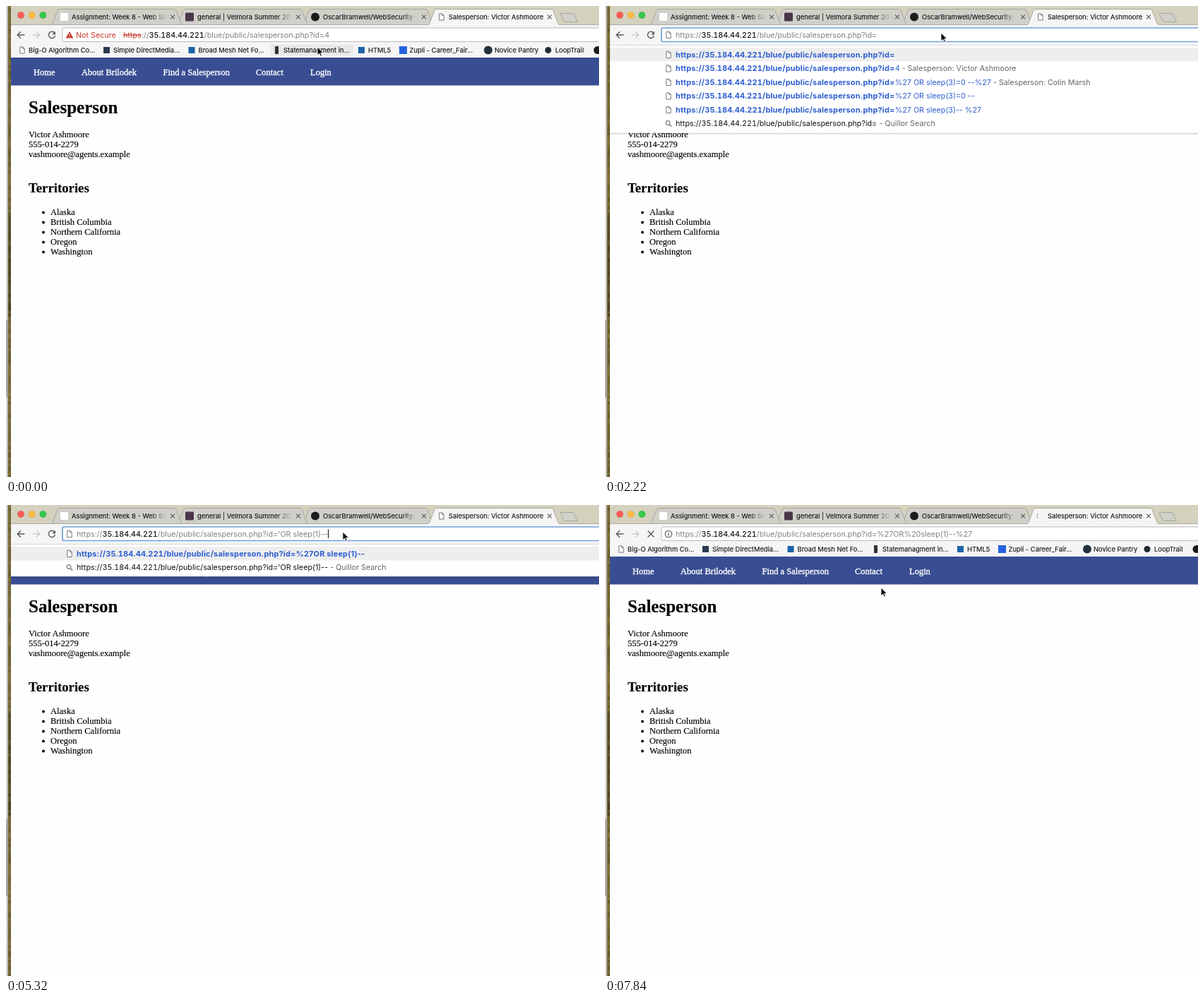
Write an HTML page that moves like this. It is 840 by 667 pixels and loops after 7990 ms.

```html
<!DOCTYPE html>
<html lang="en">
<head>
<meta charset="utf-8">
<title>Salesperson</title>
<style>
  html, body { margin: 0; width: 100%; height: 100%; overflow: hidden; background: #fefefe; }
  svg { display: block; }
  text { white-space: pre; }
  .ui { font-family: Inter, "Open Sans", sans-serif; font-size: 9.4px; fill: #111; stroke: #111; stroke-width: .12; }
  .url { font-family: Inter, "Open Sans", sans-serif; font-size: 10.75px; fill: #111; }
  .page { font-family: "Liberation Serif", "Times New Roman", serif; font-size: 12.5px; fill: #000; stroke: #000; stroke-width: .15; }
  .nav { fill: #fff; stroke: #fff; stroke-width: .35; }
  .h1 { font-size: 25px; font-weight: 700; }
  .h2 { font-size: 18.75px; font-weight: 700; }
  .tab { font-variant-numeric: tabular-nums; }
  .dim { fill: #808080; }
  .host { fill: #161616; font-weight: 500; }
  .bad { fill: #c5392b; }
  .strike { text-decoration: line-through; }
  .link { fill: #2f5fd0; }
  .bold { font-size: 11px; font-weight: 700; letter-spacing: .14px; }
  .note { fill: #666; }
</style>
</head>
<body>
<svg id="stage" width="840" height="667" viewBox="0 0 840 667">
  <defs>
    <linearGradient id="fade">
      <stop offset="0" stop-color="#d0d0ca" stop-opacity="0"/>
      <stop offset=".85" stop-color="#d0d0ca"/>
    </linearGradient>
    <linearGradient id="shade" x2="0" y2="1">
      <stop offset="0" stop-opacity=".22"/>
      <stop offset="1" stop-opacity="0"/>
    </linearGradient>
  </defs>
  <g id="desk"></g>
  <g id="page"></g>
  <g id="chrome"></g>
  <g id="live"></g>
</svg>
<script>
const STEP = 148, LOOP = 7990, LAST = 53;
const PERSON = 'Victor Ashmoore';
const $ = id => document.getElementById(id);

const rect = (x, y, w, h, fill, more = '') =>
  `<rect x="${x}" y="${y}" width="${w}" height="${h}" fill="${fill}" ${more}/>`;
const circle = (x, y, r, fill, more = '') =>
  `<circle cx="${x}" cy="${y}" r="${r}" fill="${fill}" ${more}/>`;
const line = (d, color, width = 1, more = '') =>
  `<path d="${d}" fill="none" stroke="${color}" stroke-width="${width}" ${more}/>`;
const text = (x, y, cls, body) => `<text x="${x}" y="${y}" class="${cls}">${body}</text>`;
const span = (cls, body) => `<tspan class="${cls}">${body}</tspan>`;
const at = (x, y, body) => `<g transform="translate(${x} ${y})">${body}</g>`;

const HOST = span('tab', '35.184.44.221'), PATH = '/blue/public/salesperson.php?id=';
const BASE = 'https://' + HOST + PATH;

const fileIcon = (x, y) => at(x, y,
  '<path d="M-3.2-4.6H.8L3.2-2.2V4.6H-3.2Z M.8-4.6V-2.2H3.2" fill="#fff" stroke="#6a6a6a" stroke-width=".9"/>');
const searchIcon = (x, y) => at(x, y,
  circle(-1, -1, 2.8, 'none', 'stroke="#777" stroke-width="1.2"') + line('M1 1L4.2 4.2', '#777', 1.5));
const cross = (x, y, r, color, w) => at(x, y, line(`M${-r} ${-r}L${r} ${r}M${r} ${-r}L${-r} ${r}`, color, w));

function desk() {
  let seed = 7, out = rect(0, 0, 8, 667, '#6f5f2c');
  const rand = () => (seed = seed * 16807 % 2147483647) / 2147483647;
  for (let y = 0; y < 667; y += 4) {
    const dark = y > 290 && y < 440 ? 8 : 0;
    out += rect(3, y, 4, 4, `hsl(${44 + rand() * 6} 42% ${28 + rand() * 8 - dark}%)`);
  }
  return out + rect(0, 0, 2.6, 667, '#dcdcda') + rect(2.6, 0, .9, 667, '#8a836c') +
    rect(0, 445, 2, 109, '#a9a9a9') + rect(0, 583, 3, 1, '#b5b5b5') + rect(0, 630, 3, 1, '#b5b5b5');
}

function page() {
  let out = rect(7, 73, 833, 594, '#fefefe') + rect(7, 73, 833, 39.5, '#394d92');
  const nav = [[39, 'Home'], [107, 'About Brilodek'], [222.5, 'Find a Salesperson'], [354, 'Contact'], [431, 'Login']];
  for (const [x, s] of nav) out += text(x, 98, 'page nav', s);
  out += text(32, 152, 'page h1', 'Salesperson') + text(32, 264, 'page h2', 'Territories');
  [PERSON, '555-014-2279', 'vashmoore@agents.example'].forEach((s, i) => {
    out += text(32, 186 + 14 * i, 'page', s);
  });
  ['Alaska', 'British Columbia', 'Northern California', 'Oregon', 'Washington'].forEach((s, i) => {
    const y = 296 + 14 * i;
    out += circle(53, y - 3.6, 2, '#000') + text(63, y, 'page', s);
  });
  return out;
}

function tab(i, title, active) {
  const x = 178 * i, fill = active ? '#f5f5f5' : '#d0d0ca';
  const edge = `M${x + 63} 27Q${x + 65} 26.5 ${x + 66} 24.5L${x + 73} 6.5Q${x + 74} 4.5 ${x + 76} 4.5` +
    `H${x + 238}Q${x + 240} 4.5 ${x + 241} 6.5L${x + 248} 24.5Q${x + 249} 26.5 ${x + 251} 27`;
  return `<path d="${edge}" fill="${fill}" stroke="#a3a198" stroke-width=".9"/>` +
    text(x + 93, 19, 'ui', title) +
    (active ? '' : rect(x + 204, 7, 28, 17, 'url(#fade)')) +
    cross(x + 236, 15.5, 2.9, '#5c5c5c', 1.2);
}

function chrome() {
  let out = rect(7, 0, 833, 27, '#d4d1bf');
  ['#fc5b57', '#fdbc40', '#34c84a'].forEach((c, i) => {
    out += circle(21 + 15.7 * i, 13, 4.8, c, 'stroke="#0002" stroke-width=".6"');
  });
  out += '<path d="M785 10.5H802Q804 10.5 805 12.5L809.5 22.5H793Q790.5 22.5 789.5 20.5Z" fill="#d0d0ca" stroke="#a3a198" stroke-width=".9"/>';
  out += tab(2, 'OscarBramwell/WebSecurity: A') + tab(1, 'general | Velmora Summer 20') +
    tab(0, 'Assignment: Week 8 - Web Se');
  out += rect(77, 10, 11, 11, '#fff', 'rx="1"') + rect(254, 9.5, 12, 12, '#4a3549', 'rx="1.5"') +
    circle(438, 15.5, 6, '#1b1b1b');
  out += rect(7, 26, 833, 1, '#aeaca3') + tab(3, 'Salesperson: ' + PERSON, true) + rect(7, 27, 833, 46, '#f5f5f5');
  out += line('M26.5 41H16.5M21 36.2L16.2 41L21 45.8', '#5a5a5a', 1.4) +
    line('M37.5 41H47.5M43 36.2L47.8 41L43 45.8', '#cccccc', 1.4);
  return out;
}

function bookmarks(hover) {
  const items = [[32, 'Big-O Algorithm Co...'], [152, 'Simple DirectMedia...'], [272.5, 'Broad Mesh Net Fo...'],
    [393, 'Statemanagment in...'], [513, 'HTML5'], [571.5, 'Zupli - Career_Fair...'], [692, 'Novice Pantry'], [778, 'LoopTrail']];
  return (hover ? rect(375, 54.5, 117, 15.5, '#e9e9e9', 'rx="2"') : '') +
    items.map(([x, s]) => text(x, 66, 'ui', s)).join('') +
    fileIcon(23, 62.5) + rect(138, 58, 9, 9, '#2b3a50') + rect(258.5, 58, 9, 9, '#1c63a8') +
    rect(381, 57, 5, 11, '#333') + rect(499, 58, 9, 9, '#1c63a8') + rect(557, 57, 11, 11, '#2563e0') +
    circle(683, 62.5, 6, '#22303f') + circle(768, 62.5, 4.5, '#1f2a30') + circle(838, 62.5, 5.5, '#1b1b1b');
}

// Characters typed after "id=", keyed by the step they appear at
const KEYS = [[19, "'OR"], [21, ' '], [22, 's'], [23, 'l'], [24, 'e'], [25, 'e'], [26, 'p'], [28, '('],
  [29, '1'], [30, ')'], [33, '-'], [35, '-'], [36, "'"]];
const typed = k => KEYS.filter(p => p[0] <= k).map(p => p[1]).join('');

function dropdown(query) {
  const bold = span('link bold', BASE);
  const rows = query
    ? [span('link bold', BASE + query.replace(/'/g, '%27')), BASE + query]
    : [bold,
      bold + span('link', '4') + span('note', ' - Salesperson: ' + PERSON),
      bold + span('link', '%27 OR sleep(3)=0 --%27') + span('note', ' - Salesperson: Colin Marsh'),
      bold + span('link', '%27 OR sleep(3)=0 --'),
      bold + span('link', '%27 OR sleep(3)-- %27'),
      BASE];
  const n = rows.length, end = 62 + 19.6 * n;
  rows[n - 1] += span('note', ' - Quillor Search');
  let out = rect(7, end, 833, 3, 'url(#shade)') + rect(7, 55, 833, end - 55, '#fff') +
    rect(7, 55, 833, .8, '#cfcfcf') + rect(7, 59, 833, 19.5, '#eeeeee');
  rows.forEach((row, i) => {
    const y = 69 + 19.5 * i;
    out += (i < n - 1 ? fileIcon : searchIcon)(90, y) + text(100, y + 3.6, 'url', row);
  });
  return out;
}

const ease = p => { p = Math.min(1, Math.max(0, p)); return p * p * (3 - 2 * p); };

function pointer(k) {
  if (k >= 39 && k < 48)
    return at(477, 40.5, line('M-2.5-6Q0-6 0-4.5V4.5Q0 6-2.5 6M2.5-6Q0-6 0-4.5M0 4.5Q0 6 2.5 6M-1.2 1H1.2', '#222', 1.1));
  let x, y;
  if (k < 11) {
    const p = ease(k / 7);
    x = 441 + 34 * p; y = 58 - 18 * p;
  } else if (k < 39) {
    x = k < 17 ? 476 : 477; y = 38;
  } else {
    const p = ease((k - 46) / 6);
    x = 477 - 86 * p; y = 38 + 79 * p;
  }
  return at(x, y, '<path d="M0 0V11.6L2.7 9.1L4.5 13.2L6.4 12.4L4.7 8.4H8.3Z" fill="#000" stroke="#fff" stroke-width=".9"/>');
}

function spinner(k) {
  const turn = -90 - 495 * (k - 39) / 14;
  return `<g transform="translate(617 15.5) rotate(${turn})">` + line('M5 0A5 5 0 0 1 0 5', '#b8b8b8', 1.3) + '</g>';
}

function draw(k) {
  const focus = k >= 7 && k < 39, edit = k >= 12 && k < 39, loading = k >= 39;
  const caret = focus && !(k >= 15 && k < 19);
  const query = edit ? typed(k) : loading ? '%27OR%20sleep(1)--%27' : '4';
  const x = edit || loading ? 100 : 166;
  const scheme = edit || loading ? span('dim', 'https://') : span('bad strike', 'https') + span('dim', '://');

  let out = edit ? '' : bookmarks(k < 2);
  out += rect(80, 31, 780, 19.5, '#fff', focus
    ? 'rx="2" stroke="#71a3da" stroke-width="1.7"' : 'rx="2" stroke="#b4b4b4" stroke-width=".9"');
  out += text(x, 44.6, 'url', scheme + span('host', HOST) + span('dim', PATH + query)).replace('<text', '<text id="addr"');

  if (edit) out += fileIcon(90, 41) + dropdown(query);
  else if (loading)
    out += circle(90, 41, 4.8, 'none', 'stroke="#555" stroke-width="1.1"') +
      rect(89.4, 40.2, 1.2, 3.4, '#555') + rect(89.4, 38.1, 1.2, 1.3, '#555');
  else
    out += '<path d="M90 36L95.4 45.6H84.6Z" fill="#c5392b"/>' + rect(89.5, 39.3, 1, 3.2, '#fff') +
      rect(89.5, 43.3, 1, 1.1, '#fff') + text(99, 44.6, 'url bad', 'Not Secure') + rect(160.5, 34, .8, 14, '#dedede');

  out += loading ? cross(65, 41, 4.4, '#5a5a5a', 1.4) + spinner(k)
    : line('M68.6 38A4.6 4.6 0 1 0 69.5 42', '#5a5a5a', 1.4) +
      '<path d="M70 35.8V40.4H65.4Z" fill="#5a5a5a"/>' + fileIcon(617, 15.5);

  $('live').innerHTML = out;
  const end = x + $('addr').getComputedTextLength();
  $('live').insertAdjacentHTML('beforeend', (caret ? rect(end, 34.5, 1, 12.5, '#000') : '') + pointer(k));
}

$('desk').innerHTML = desk();
$('page').innerHTML = page();
$('chrome').innerHTML = chrome();

let shown = -1;
const start = performance.now();
function tick() {
  const t = (performance.now() - start) % LOOP;
  const k = Math.min(LAST, Math.floor((t + 3) / STEP));
  if (k !== shown) draw(shown = k);
  requestAnimationFrame(tick);
}
tick();
</script>
</body>
</html>
```
